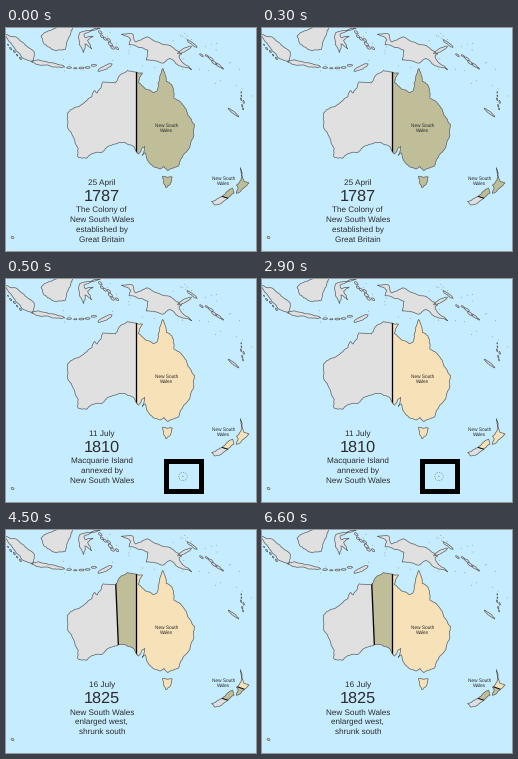
Write a matplotlib script that moves like this. It is 250x223 px and loops after 8000 ms.

```python
import random
import numpy as np
import matplotlib.pyplot as plt
from matplotlib.animation import FuncAnimation
from matplotlib.patches import Circle, Polygon, Rectangle

W, H, DPI = 250, 223, 100
SEA, LAND, COAST, INK = "#c6ecff", "#e0e0e0", "#5a5f62", "#2c2c2c"
CHANGED, COLONY = "#bfbe98", "#f6e1b9"
rng = random.Random(4)

plt.rcParams["font.family"] = "Liberation Sans"
plt.rcParams["text.hinting"] = "none"
plt.rcParams["text.hinting_factor"] = 8
fig = plt.figure(figsize=(W / DPI, H / DPI), dpi=DPI, facecolor=SEA)
ax = fig.add_axes([0, 0, 1, 1])
ax.set_xlim(0, W)
ax.set_ylim(H, 0)
ax.axis("off")


def pt(px):
    return px * 72 / DPI


def project(points):
    """Orthographic globe seen from above central Australia."""
    lon, lat = np.radians(np.array(points, float)).T
    d, c = lon - np.radians(135), np.radians(-25)
    x = np.cos(lat) * np.sin(d)
    y = np.cos(c) * np.sin(lat) - np.sin(c) * np.cos(lat) * np.cos(d)
    return np.column_stack([130.2 + 207 * x, 90.8 - 207 * y])


def roughen(pts, depth=3):
    """Turn straight edges into a jagged coast by midpoint displacement."""
    if depth == 0:
        return pts
    out = []
    for a, b in zip(pts, np.roll(pts, -1, axis=0)):
        out.append(a)
        dx, dy = b - a
        if np.hypot(dx, dy) > 1.8:
            out.append((a + b) / 2 + rng.uniform(-0.1, 0.1) * np.array([-dy, dx]))
    return roughen(np.array(out), depth - 1)


def coast(*points):
    return roughen(project(points))


def chain(x0, y0, x1, y1, count, length, width):
    """Elongated islands strung along a line."""
    turn = np.arctan2(y1 - y0, x1 - x0)
    ring = np.linspace(0, 2 * np.pi, 10, endpoint=False)
    for i in range(count):
        t = (i + 0.5) / count
        size = 1 if count == 1 else rng.uniform(0.5, 1.1)
        side = 0 if count == 1 else rng.uniform(-2, 2)
        u = size * length / 2 * np.cos(ring)
        v = size * width / 2 * np.sin(ring) + side
        yield roughen(np.column_stack([
            x0 + (x1 - x0) * t + u * np.cos(turn) - v * np.sin(turn),
            y0 + (y1 - y0) * t + u * np.sin(turn) + v * np.cos(turn)]))


mainland = coast(
    (142.5, -10.7), (143.6, -14.3), (145.3, -15.2), (146.1, -18.8),
    (148.8, -20.3), (150.8, -23.2), (153.2, -25.5), (153.5, -28.5),
    (152.8, -32), (150.2, -36), (149.9, -37.5), (146.4, -39.1),
    (144.8, -38), (143.6, -38.8), (140, -37.6), (138.4, -35.5),
    (138, -34.4), (137, -35.2), (137.8, -32.6), (135.8, -34.8),
    (134, -32.6), (131.2, -31.5), (126, -32.3), (123.6, -33.9), (120, -34),
    (118, -35.1), (115, -34.3), (115.7, -32), (113.4, -26), (114.1, -21.9),
    (119, -20), (122, -18.2), (122.9, -16.6), (123.6, -17.4),
    (125.5, -14.4), (129, -14.9), (130.8, -12.4), (132.5, -11.5),
    (136.8, -12.2), (135.6, -14.9), (140, -17.7), (141, -17.2),
    (141.7, -13))
tasmania = coast((144.7, -40.8), (148.3, -40.8), (147.9, -43.1),
                 (146.6, -44.1), (145.4, -42.8))
north_island = coast(
    (172.7, -34.4), (174.9, -36.8), (176.2, -37.7), (178.5, -37.6),
    (177.3, -39.5), (175.3, -41.6), (175.1, -40.1), (173.8, -39.4),
    (174.7, -37.6))
south_island = coast(
    (172.7, -40.5), (174.3, -41.7), (172.8, -43.7), (170.7, -45.8),
    (168.4, -46.6), (166.5, -45.9), (170.8, -42.8))
zealand = [north_island, south_island]
claimed = [mainland, tasmania] + zealand

new_guinea = coast(
    (130.9, -0.8), (134.1, -0.9), (134.8, -3.2), (138, -1.6), (144.5, -3.9),
    (147.8, -6.1), (147, -6.8), (150.8, -10.4), (147.2, -9.6),
    (144.5, -7.7), (142.5, -9.2), (137.8, -8.4), (138.3, -5.6), (133, -4),
    (133.5, -2.4))
borneo = coast((107.6, 1.5), (113, 3.2), (117, 7), (117.5, 3), (116.5, 0.5),
               (115, -3.8), (111, -3.2), (108.5, -1))
sulawesi = coast((119.2, 0.6), (125, 1.4), (120.4, 0), (120.8, -1.2),
                 (123, -0.9), (121.4, -2), (122.5, -4.6), (120.6, -3),
                 (120.2, -5.5), (119, -3))
sumatra = coast((95, 5.6), (100, 2.8), (103.5, -1), (105.5, -3),
                (104.8, -5.8), (101.5, -3.6), (98, 1.5))
neighbours = [
    new_guinea, borneo, sulawesi, sumatra,
    *chain(25, 33, 59, 39, 1, 34, 4.5),     # Java
    *chain(60, 40, 91, 39, 5, 6, 2),        # Lesser Sundas
    *chain(92, 43, 106, 36, 1, 16, 3.5),    # Timor
    *chain(92, 4, 112, 22, 7, 5, 2.5),      # Moluccas
    *chain(171, 26, 186, 18, 1, 16, 3),     # New Britain
    *chain(180, 11, 192, 20, 1, 13, 2),     # New Ireland
    *chain(194, 25, 218, 42, 6, 6, 2),      # Solomons
    *chain(222, 80, 233, 89, 1, 14, 2),     # New Caledonia
    *chain(234, 63, 239, 82, 6, 3, 1.2),    # Vanuatu
    *chain(2, 14, 16, 32, 5, 3, 1.2),       # Mentawai
    *chain(5, 209, 8, 210, 1, 3, 2),        # Kerguelen
]


def band(lon0, lon1, lat0, lat1):
    """Clip shape between two meridians and two parallels."""
    lons = np.linspace(lon0, lon1, 20)
    ring = [(x, lat1) for x in lons] + [(x, lat0) for x in lons[::-1]]
    return Polygon(project(ring), transform=ax.transData)


def fill(pts, color, clip=None, z=2):
    patch = Polygon(pts, fc=color, ec="none", zorder=z)
    ax.add_patch(patch)
    if clip is not None:
        patch.set_clip_path(clip)
    return patch


def border(points, shapes, width):
    lines = []
    for pts in shapes:
        line, = ax.plot(*project(points).T, color="black", lw=pt(width),
                        zorder=5)
        line.set_clip_path(Polygon(pts, transform=ax.transData))
        lines.append(line)
    return lines


def meridian(lon):
    return border([(lon, -8), (lon, -40)], [mainland], 1.3)


def parallel(lat):
    return border([(x, lat) for x in range(164, 181)], zealand, 1)


def label(x, y, size, text=""):
    return ax.text(x, y, text, fontsize=pt(size), ha="center",
                   va="baseline", color=INK, zorder=8)


for shape in neighbours + claimed:
    fill(shape, LAND)
    ax.add_patch(Polygon(shape, fc="none", ec=COAST, lw=pt(0.7), zorder=4))

# stray islets over the northern seas
for _ in range(45):
    x = rng.uniform(55, W)
    y = rng.uniform(0, 45) + max(0, x - 190) * 0.6
    ax.add_patch(Circle((x, y), 0.35, fc=COAST, ec="none", zorder=1))

east = band(135, 160, -45, -8)
middle = band(129, 135, -45, -8)
far_north = band(163, 182, -43.65, -32)
far_south = band(163, 182, -43.65, -39.2)

colony = [fill(mainland, COLONY, east), fill(tasmania, COLONY)]
colony += [fill(s, COLONY, far_north) for s in zealand]
enlarged = [fill(mainland, CHANGED, middle, 3)]
enlarged += [fill(s, CHANGED, far_south, 3) for s in zealand]

meridian(135)
parallel(-43.65)
enlarged += meridian(129) + parallel(-39.2)

for x, y in ((160.7, 98.5), (218, 151.5)):
    label(x, y, 4.7, "New South")
    label(x, y + 5.6, 4.7, "Wales")

marker = [
    Rectangle((159.5, 182), 35.5, 29.5, fc="none", ec="black", lw=pt(5),
              joinstyle="miter", zorder=6),
    Circle((177, 197.5), 4.2, fc="none", ec="#6f7f8a", lw=pt(0.6),
           ls=(0, (2, 2)), zorder=6),
    Circle((177, 197.5), 0.5, fc=COAST, ec="none", zorder=6),
]
for patch in marker:
    ax.add_patch(patch)

date = label(95.8, 157, 8.3)
year = label(95.8, 173.2, 16.2)
notes = [label(95.8, 184.6 + 9.8 * i, 8.15) for i in range(4)]

EVENTS = [
    ("25 April", "1787", ["The Colony of", "New South Wales",
                          "established by", "Great Britain"]),
    ("11 July", "1810", ["Macquarie Island", "annexed by",
                         "New South Wales"]),
    ("16 July", "1825", ["New South Wales", "enlarged west,",
                         "shrunk south"]),
]
STEP = 500
STARTS = (0, 500, 4500)


def draw(i):
    stage = sum(i * STEP >= s for s in STARTS) - 1
    day, when, lines = EVENTS[stage]
    date.set_text(day)
    year.set_text(when)
    for k, note in enumerate(notes):
        note.set_text(lines[k] if k < len(lines) else "")
    for patch in colony:
        patch.set_facecolor(CHANGED if stage == 0 else COLONY)
    for art in marker:
        art.set_visible(stage == 1)
    for art in enlarged:
        art.set_visible(stage == 2)
    return []


anim = FuncAnimation(fig, draw, frames=8000 // STEP, interval=STEP,
                     init_func=lambda: draw(0), repeat=True, repeat_delay=0,
                     blit=False)
plt.show()
```
